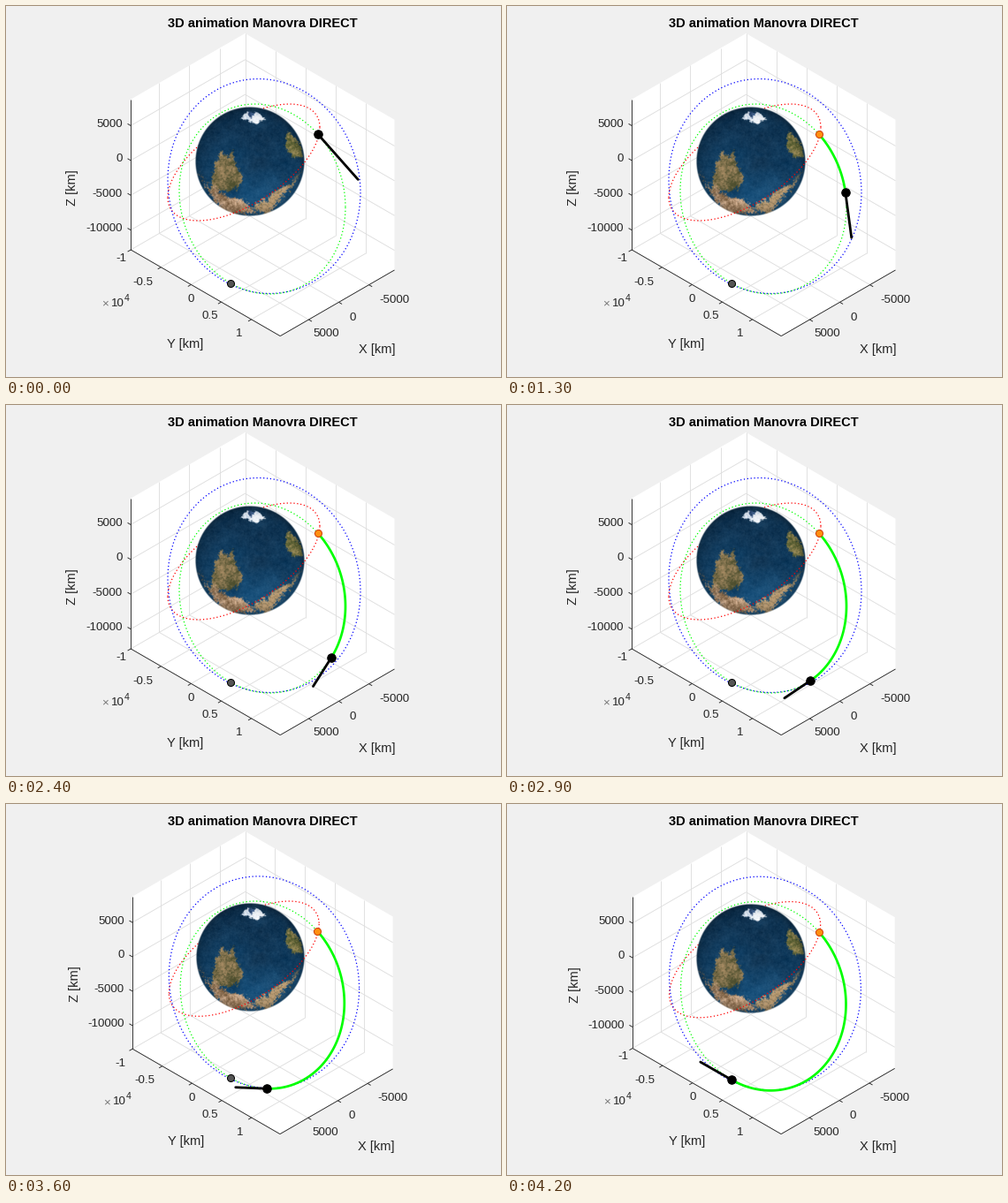
These frames come from a looping animation (560 by 420 pixels, 4300 ms). A matplotlib script:

```python
import numpy as np
import matplotlib.pyplot as plt
from matplotlib.animation import FuncAnimation
from matplotlib.collections import LineCollection
from matplotlib.colors import to_rgb
from matplotlib.path import Path
from matplotlib.transforms import Affine2D

W, H, DPI = 560, 420, 70
PX = 72 / DPI                      # points per pixel
FRAMES, STEP = 43, 100

plt.rcParams["font.family"] = "Liberation Sans"

fig = plt.figure(figsize=(W / DPI, H / DPI), dpi=DPI, facecolor="#f0f0f0")
ax = fig.add_axes([0, 0, 1, 1])
ax.axis("off")

zoom = Affine2D()
scene = zoom + ax.transData

# Isometric projection, km to pixels
ORIGIN = np.array([275.7, 176.0])
KX, KY, KZ = 0.00682, 0.00394, 0.00788
X0, X1 = -9238, 9720
Y0, Y1 = -10010, 14780
Z0, Z1 = -12830, 8780
X_TICKS = range(-5000, 5001, 5000)
Y_TICKS = range(-10000, 10001, 5000)
Z_TICKS = range(-10000, 5001, 5000)


def project(x, y, z):
    return ORIGIN + (KX * (y - x), KY * (x + y) - KZ * z)


def line3(a, b):
    return [project(*a), project(*b)]


def face_outline(zb):
    corners = [(X1, Y0, Z1), (X0, Y0, Z1), (X0, Y1, Z1),
               (X0, Y1, zb), (X1, Y1, zb), (X1, Y0, zb)]
    return [project(*c) for c in corners]


def grid_lines(zb):
    segs = []
    for x in X_TICKS:
        segs += [line3((x, Y0, zb), (x, Y0, Z1)), line3((x, Y0, zb), (x, Y1, zb))]
    for y in Y_TICKS:
        segs += [line3((X0, y, zb), (X0, y, Z1)), line3((X0, y, zb), (X1, y, zb))]
    for z in Z_TICKS:
        segs += [line3((X0, Y0, z), (X1, Y0, z)), line3((X0, Y0, z), (X0, Y1, z))]
    return segs


def axis_lines(zb):
    segs = [line3((X1, Y0, zb), (X1, Y0, Z1)),
            line3((X1, Y0, zb), (X1, Y1, zb)),
            line3((X1, Y1, zb), (X0, Y1, zb))]
    out = np.array([3.6, 2.1])
    ticks = [(project(x, Y1, zb), out) for x in X_TICKS]
    ticks += [(project(X1, y, zb), out * (-1, 1)) for y in Y_TICKS]
    ticks += [(project(X1, Y0, z), -out) for z in Z_TICKS]
    return segs + [[p, p + d] for p, d in ticks]


walls = ax.fill([0, 1, 1], [0, 0, 1], color="white", lw=0, zorder=0, transform=scene)[0]
grid = LineCollection([], colors="#dedede", linewidths=0.9 * PX, zorder=1)
frame = LineCollection([], colors="#262626", linewidths=0.9 * PX, zorder=2)
for coll in (grid, frame):
    ax.add_collection(coll, autolim=False)
    coll.set_transform(scene)


# Planet
RADIUS = 61.5
LANDS = [  # outline, dark tone, light tone, coast roughness
    ([(243, 164), (251, 171), (255, 163), (258, 178), (268, 192), (262, 207),
      (231, 209), (231, 190)], "#4c4e2e", "#a88c64", 1.6),
    ([(211, 186), (226, 204), (252, 214), (283, 234), (250, 240)],
     "#785c3e", "#deba9a", 2.2),
    ([(280, 229), (302, 216), (317, 204), (336, 186), (298, 239)],
     "#3e3c26", "#c4a47a", 2.4),
    ([(319, 142), (331, 153), (335, 170), (327, 171), (316, 159)],
     "#545c30", "#beA46c", 1.4),
    ([(272, 122), (285, 121), (294, 129), (283, 135), (264, 130)],
     "#bad0e8", "#fafcff", 1.1),
    ([(273, 121), (282, 121), (276, 130)], "#18345c", "#466896", 0.8),
]


def noise(rng, n, power):
    f = np.fft.fftfreq(n)
    r = np.hypot(f[:, None], f[None, :])
    r[0, 0] = 1
    z = np.fft.ifft2(np.fft.fft2(rng.standard_normal((n, n))) / r ** power).real
    return (z - z.mean()) / z.std()


def blend(mix, dark, light):
    m = np.clip(mix, 0, 1)[..., None]
    return (1 - m) * np.array(to_rgb(dark)) + m * np.array(to_rgb(light))


def planet_image(n=252, half=63):
    rng = np.random.default_rng(7)
    c = (np.arange(n) + 0.5) / n * 2 * half - half
    u, v = np.meshgrid(c, c)
    soft, fine = noise(rng, n, 1.6), noise(rng, n, 0.8)
    jx, jy = noise(rng, n, 1.0), noise(rng, n, 1.0)

    rgb = blend((v + RADIUS) / (2 * RADIUS) + 0.1 * soft, "#0e2e4a", "#19507a")
    rgb += 0.02 * fine[..., None]
    for outline, dark, light, rough in LANDS:
        pts = np.column_stack([(u + ORIGIN[0] + rough * jx).ravel(),
                               (v + ORIGIN[1] + rough * jy).ravel()])
        inside = Path(outline).contains_points(pts).reshape(n, n)
        rgb[inside] = blend(0.5 + 0.22 * soft + 0.28 * fine, dark, light)[inside]

    dist = np.hypot(u, v)
    rgb *= (1 - 0.25 * np.clip(dist / RADIUS, 0, 1) ** 10)[..., None]
    alpha = np.clip(RADIUS + 0.5 - dist, 0, 1)
    return np.dstack([np.clip(rgb, 0, 1), alpha])


cx, cy = ORIGIN
ax.imshow(planet_image(), extent=(cx - 63, cx + 63, cy + 63, cy - 63), aspect="auto",
          interpolation="bilinear", zorder=4, transform=scene)
ax.set(xlim=(0, W), ylim=(H, 0))
ax.set_autoscale_on(False)


# Orbits: centre, half sizes, phase of the vertical component
BLUE = (292, 204, 109, 121.5, np.radians(3.4))
GREEN = (290, 218.5, 94, 107.5, np.radians(5))
RED = (269, 177, 86, 66, np.radians(-37))


def orbit(shape, t):
    ox, oy, a, b, d = shape
    return np.array([ox + a * np.cos(t), oy + b * np.sin(t + d)])


def velocity(t):
    _, _, a, b, d = GREEN
    rate = 0.535 / (1 - 0.45 * np.cos(t + np.radians(115)))
    return rate * np.array([-a * np.sin(t), b * np.cos(t + d)])


def dotted(shape, color, start, stop, z):
    t = np.linspace(start, stop, 300)
    ax.plot(*orbit(shape, t), color=color, lw=1.25 * PX, ls=(0, (1, 2.1)),
            dash_capstyle="butt", zorder=z, transform=scene)


def dot(face, edge, size, z):
    return ax.plot([], [], "o", ms=size * PX, mfc=face, mec=edge, mew=PX,
                   zorder=z, transform=scene)[0]


dotted(RED, "#ff0000", np.pi, 2 * np.pi, 3)
dotted(RED, "#ff0000", 0, np.pi, 5)
dotted(BLUE, "#0000ff", 0, 2 * np.pi, 5)
dotted(GREEN, "#00ff00", 0, 2 * np.pi, 5)

# Position on the transfer arc through time
KEY_S = [0, 0.8, 1.9, 2.9, 3.6, 4.2]
KEY_DEG = [-47.9, -25.3, 13.5, 56, 87, 112.5]
sweep = np.polyfit(KEY_S, np.radians(KEY_DEG), 4)
T_START, T_END = np.radians([KEY_DEG[0], KEY_DEG[-1]])

trail = ax.plot([], [], color="#00ff00", lw=2.7 * PX, zorder=6, transform=scene)[0]
start_dot = dot("#ff9010", "#d03c00", 8, 7)
end_dot = dot("#555555", "#000000", 8, 7)
arrow = ax.plot([], [], color="black", lw=2.8 * PX, solid_capstyle="round",
                zorder=8, transform=scene)[0]
craft = dot("black", "black", 9.5, 9)
start_dot.set_data(*orbit(GREEN, np.array([T_START])))
end_dot.set_data(*orbit(GREEN, np.array([T_END])))


# Text; floor labels follow the lower limit of the box
def label(x, y, s, size=13.33, ha="center", color="#262626", **kw):
    return ax.text(x, y, s, fontsize=size * PX, ha=ha, va="center_baseline",
                   color=color, zorder=10, transform=scene, **kw)


ax.text(290.5, 19, "3D animation Manovra DIRECT", fontsize=14.67 * PX, weight="bold",
        ha="center", va="center_baseline", zorder=10)
label(75.5, 191, "Z [km]", 14.67, rotation=90)
for z in Z_TICKS:
    label(132, 171.7 - KZ * z, str(z), ha="right")

floor_text = [label(155, 311, "-0.5"), label(209.5, 330.5, "0"),
              label(230.5, 350, "0.5"), label(264, 370, "1"),
              label(362, 370, "5000"), label(392, 351, "0"), label(439, 331, "-5000"),
              label(112, 336, "\u00d7", color="#777777"), label(126, 335.5, "10"),
              label(136.5, 329.5, "4", 10.5),
              label(203, 381, "Y [km]", 14.67), label(420, 387, "X [km]", 14.67)]
floor_y = [text.get_position()[1] for text in floor_text]
corner_text = label(130, 284.5, "-1")


def extra_depth(s):
    return np.interp(s, [2.9, 3.1, 3.3, 3.4, 4.2], [0, 3.2, 5.2, 5.2, 1.9])


def update(i):
    s = i * STEP / 1000
    deep = extra_depth(s)
    k = 342.5 / (342.5 + deep)
    zoom.clear().translate(-290, -31).scale(k).translate(290, 31)

    zb = Z0 - deep / KZ
    walls.set_xy(face_outline(zb))
    grid.set_segments(grid_lines(zb))
    frame.set_segments(axis_lines(zb))
    for text, y in zip(floor_text, floor_y):
        text.set_y(y + deep)
    low = deep > 3
    corner_text.set_position((127 if low else 130, 284.5 + deep + 7 * low))

    t = np.polyval(sweep, s)
    pos = orbit(GREEN, t)
    tip = pos + velocity(t)
    trail.set_data(*orbit(GREEN, np.linspace(T_START, t, 120)))
    arrow.set_data([pos[0], tip[0]], [pos[1], tip[1]])
    craft.set_data([pos[0]], [pos[1]])
    return ()


anim = FuncAnimation(fig, update, frames=FRAMES, interval=STEP, repeat=True,
                     repeat_delay=0, blit=False, init_func=lambda: update(0))
plt.show()
```
